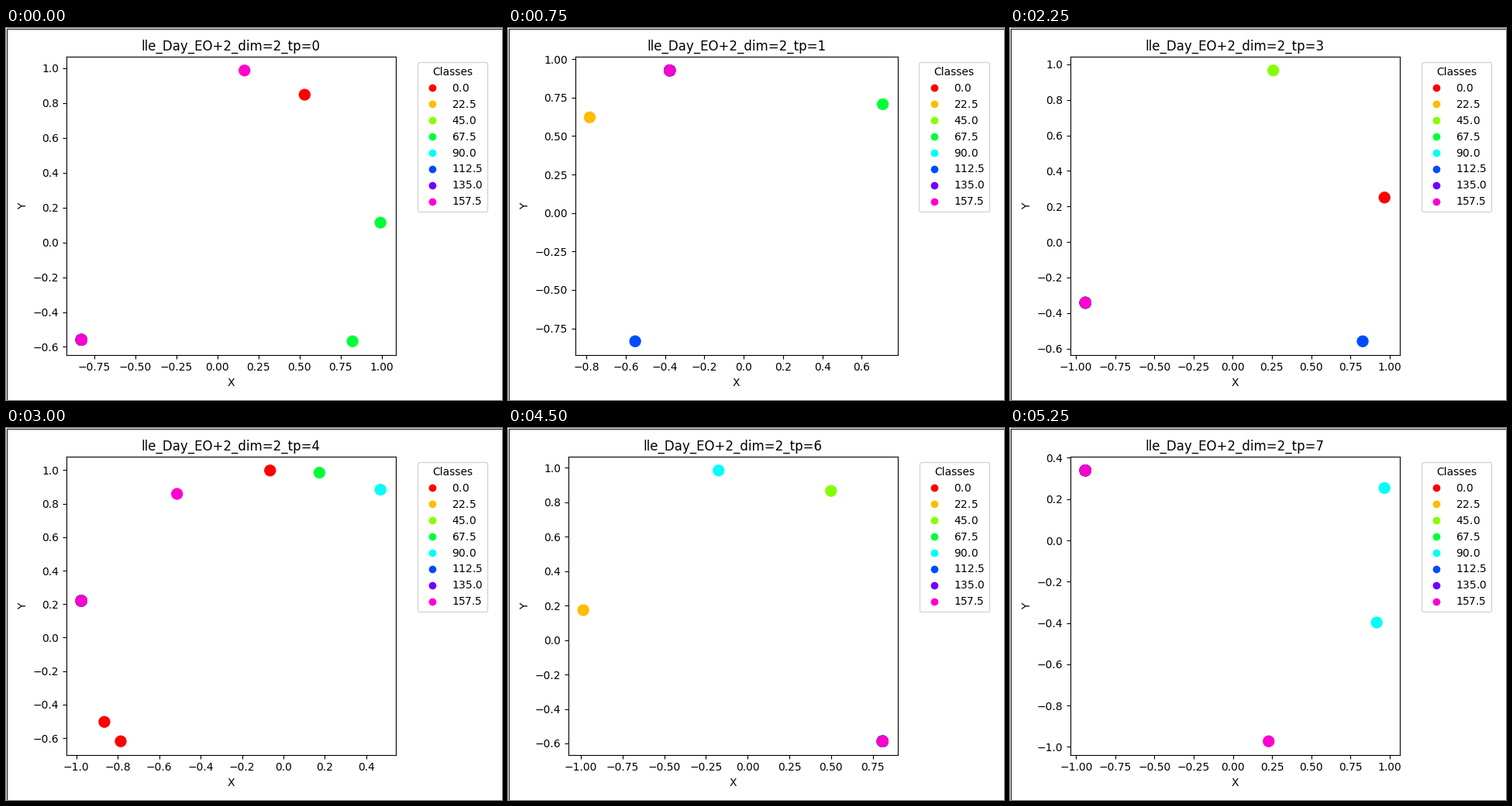
Recreate the animation shown at these times as a matplotlib script. Size 640x480 px, loop 6000 ms.

```python
import numpy as np
import matplotlib.pyplot as plt
from matplotlib.animation import FuncAnimation
from matplotlib.patches import Rectangle
from matplotlib.transforms import IdentityTransform

W, H, DPI = 640, 480, 100
CLASSES = np.arange(8) * 22.5
REPEATS = 6  # coincident samples of each class in the cluster

# Per time point: cluster angle, then (class index, angle) of the outliers.
# All points lie on the unit circle; angles in degrees.
STEPS = [
    (214.0, [(0, 57.9), (3, 6.5), (3, -34.6), (7, 80.5)]),
    (112.1, [(1, 141.55), (3, 45.0), (5, 236.5)]),
    (-49.5, [(0, -39.58), (4, -75.79), (5, 40.15), (5, 36.43)]),
    (200.0, [(0, 14.5), (2, 75.0), (5, -34.0)]),
    (167.3, [(0, 93.7), (0, 210.2), (0, 218.24), (3, 80.0),
             (4, 62.06), (7, 120.9)]),
    (2.5, [(0, 261.45), (2, 163.1), (2, 80.2), (3, 260.4), (4, -80.2),
           (5, 78.75), (6, 233.95)]),
    (-36.0, [(1, 170.0), (2, 60.0), (4, 100.0)]),
    (160.2, [(4, 14.7), (4, -23.45), (7, -76.8)]),
]

plt.rcParams["font.family"] = "DejaVu Sans"
fig, ax = plt.subplots(figsize=(W / DPI, H / DPI), dpi=DPI)
fig.add_artist(Rectangle((0.5, 0.5), W - 1, H - 1, fill=False,
                         edgecolor="black", linewidth=72 / DPI,
                         transform=IdentityTransform()))


def update(step):
    center, outliers = STEPS[step]
    index, angles = zip(*outliers)
    cluster = np.tile(CLASSES, REPEATS)
    values = np.concatenate([CLASSES[list(index)], cluster])
    theta = np.radians(np.concatenate([angles, np.full(len(cluster), center)]))

    ax.clear()
    points = ax.scatter(np.cos(theta), np.sin(theta), c=values, s=100,
                        cmap="hsv", vmin=0, vmax=180)
    ax.set_title(f"lle_Day_EO+2_dim=2_tp={step}")
    ax.set_xlabel("X")
    ax.set_ylabel("Y")
    ax.legend(*points.legend_elements(), title="Classes",
              bbox_to_anchor=(1.05, 1), loc="upper left")

    # Start every layout from the same margins.
    fig.subplots_adjust(left=0.125, right=0.9, bottom=0.11, top=0.88)
    fig.tight_layout()


anim = FuncAnimation(fig, update, frames=len(STEPS), interval=750,
                     repeat=True, repeat_delay=0)
plt.show()
```
